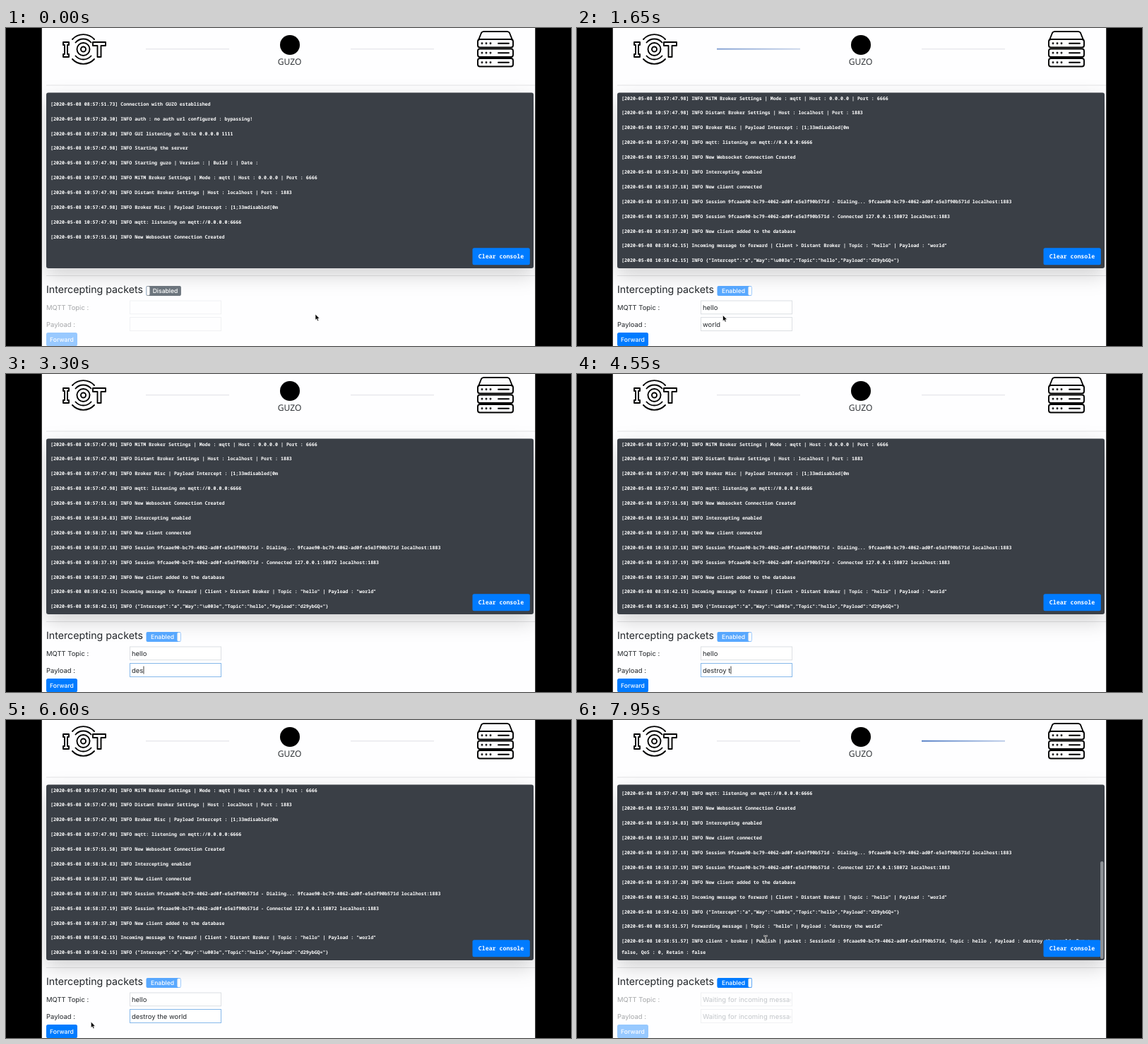
Write an HTML page that moves like this. It is 800 by 450 pixels and loops after 8000 ms.

```html
<!DOCTYPE html>
<html lang="en">
<head>
<meta charset="utf-8">
<title>Packet console</title>
<style>
html, body { margin: 0; width: 100%; height: 100%; overflow: hidden; background: #000; }
svg { display: block; width: 100%; height: 100%; text-rendering: geometricPrecision; }
text { font-family: Inter, Roboto, sans-serif; font-size: 9.45px; fill: #212529; white-space: pre; }
.mono, #lines text { font-family: "Noto Sans Mono", "DejaVu Sans Mono", monospace; font-weight: 700; fill: #fff; }
#lines text { font-size: 6.63px; }
.mid { text-anchor: middle; }
.btn { font-size: 8.6px; fill: #fff; font-weight: 500; }
.icon { fill: none; stroke: #000; stroke-width: 1.9; stroke-linejoin: round; stroke-linecap: round; }
.field { fill: #fff; stroke: #dcdfe3; }
.hint { fill: #6c757d; }
.panel { filter: drop-shadow(0 10px 14px rgba(0, 0, 0, .175)); }
</style>
</head>
<body>
<svg viewBox="0 0 800 450">
  <defs>
    <clipPath id="pageClip"><rect x="50.500" width="699" height="450"/></clipPath>
    <clipPath id="consoleClip"><rect x="57" y="92" width="690" height="248"/></clipPath>
    <clipPath id="fieldClip"><rect x="177" y="380" width="125.500" height="60"/></clipPath>
    <clipPath id="toggleClip"><rect x="198.500" y="365" width="49.300" height="14" rx="2"/></clipPath>
    <linearGradient id="flow">
      <stop offset="0" stop-color="#4a78c4"/><stop offset="1" stop-color="#bccdea"/>
    </linearGradient>
  </defs>

  <g clip-path="url(#pageClip)">
    <rect x="50.500" width="699" height="450" fill="#fefeff"/>

    <g class="icon">
      <path d="M81 20h8v4h-2v13h2v4h-8v-4h2v-13h-2z"/>
      <path d="M123 20h18v5h-6.500v16h-5v-16h-6.500z"/>
      <circle cx="109.500" cy="30" r="3.500"/>
      <circle cx="109.500" cy="30" r="9"/>
      <path d="M98.500 20.500a14.500 14.500 0 0 1 22 0M98.500 39.500a14.500 14.500 0 0 0 22 0"/>
      <path d="M94 16a21 21 0 0 1 31 0M94 44a21 21 0 0 0 31 0"/>
    </g>
    <circle cx="402" cy="24" r="14"/>
    <text class="mid" x="401.500" y="52" style="font:12px 'Open Sans',sans-serif">GUZO</text>
    <g class="icon" id="server"><path d="M669 17l4-10q1-2 3.500-2h33q2.500 0 3.500 2l4 10"/></g>

    <g fill="#ececef">
      <rect x="198" y="28.800" width="118" height="1.800"/>
      <rect x="488" y="28.800" width="118" height="1.800"/>
    </g>
    <rect id="wireIn" x="198" y="28.800" width="118" height="1.800" fill="url(#flow)"/>
    <rect id="wireOut" x="488" y="28.800" width="118" height="1.800" fill="url(#flow)"/>
    <path d="M57 81h692M57 350.500h692" stroke="#e4e4e6"/>

    <rect class="panel" x="57" y="91.500" width="690" height="248.500" rx="3" fill="#3a3f46"/>
    <g clip-path="url(#consoleClip)"><g id="lines"></g></g>
    <rect x="660.500" y="311.300" width="81.300" height="24" rx="2.500" fill="#007bff"/>
    <text class="mono mid" x="701" y="326.400" style="font-size:8.25px;font-weight:600">Clear console</text>
    <rect id="scrollbar" x="741" y="200" width="4.500" height="138" rx="2.200" fill="#8d9196"/>

    <text x="57" y="375" style="font-size:14.2px;font-weight:400">Intercepting packets</text>
    <g id="toggle" clip-path="url(#toggleClip)">
      <g id="slider">
        <rect x="198" y="365" width="50" height="14" fill="#007bff"/>
        <rect x="247.500" y="365" width="50" height="14" fill="#6c757d"/>
        <text class="btn mid" x="221.500" y="375">Enabled</text>
        <text class="btn mid" x="274.500" y="375">Disabled</text>
        <rect x="242.700" y="365.500" width="9.600" height="13" rx="2" fill="#fbfbfc" stroke="#d5d9dd" stroke-width=".6"/>
      </g>
      <rect id="toggleEdge" x="198.800" y="365.300" width="48.700" height="13.400" rx="2" fill="none" stroke-width=".7"/>
    </g>

    <g id="form">
      <text x="57" y="399">MQTT Topic :</text>
      <text x="57" y="422.700">Payload :</text>
      <rect class="field" x="175.500" y="386" width="129" height="18.700"/>
      <rect class="field" id="payloadBox" x="175.500" y="409.500" width="129" height="19"/>
      <rect id="selection" y="413" height="12" fill="#a8cdf6"/>
      <g clip-path="url(#fieldClip)">
        <text id="topic" x="178" y="399"></text>
        <text id="payload" x="178" y="422.700"></text>
      </g>
      <rect id="caret" y="413.500" width=".8" height="11" fill="#111"/>
      <rect id="forward" x="57" y="431" width="44" height="19.200" rx="2.500"/>
      <text class="btn mid" x="79" y="443.700">Forward</text>
    </g>
  </g>

  <g id="cursor">
    <path id="arrow" d="M0 0v8.300l1.900-1.700 1.300 3 1.500-.6-1.300-2.900h2.600z" fill="#000" stroke="#fff" stroke-width=".6"/>
    <path id="hand" d="M-1 .6q0-1 .9-1t.9 1v3.200l3.200.7q1 .3.900 1.400l-.6 3.600h-4.600l-2.900-3.900q-.1-1.300 1.200-.8l1 .9z" fill="#fff" stroke="#000" stroke-width=".9"/>
    <g id="beam" fill="none" stroke-linecap="round">
      <path d="M-2-4.500q2 0 2 1.200v6.600q0 1.200-2 1.200M2-4.500q-2 0-2 1.200m0 6.600q0 1.200 2 1.200" stroke="#fff" stroke-width="1.800"/>
      <path d="M-2-4.500q2 0 2 1.200v6.600q0 1.200-2 1.200M2-4.500q-2 0-2 1.200m0 6.600q0 1.200 2 1.200" stroke="#222" stroke-width=".8"/>
    </g>
  </g>
</svg>

<script>
const LOOP = 8000;
const ENABLE = 990, CONNECT = 1350, INCOMING = 1550, DRAG = 2050;
const TYPE = 2860, KEY_GAP = 205, PRESS = 7200, SEND = 7450;
const PITCH = 20.88, FIRST = 109.8, LAST = 331.3;
const ID = '9fcaae90-bc79-4062-ad0f-e5e3f90b571d';
const NEW_TEXT = 'destroy the world';

// [time shown, clock, message, wrapped remainder]
const LOG = [
  [0, '08:57:51.73', 'Connection with GUZO established'],
  [0, '10:57:20.30', 'INFO auth : no auth url configured : bypassing!'],
  [0, '10:57:20.30', 'INFO GUI listening on %s:%s 0.0.0.0 1111'],
  [0, '10:57:47.98', 'INFO Starting the server'],
  [0, '10:57:47.98', 'INFO Starting guzo | Version : | Build : | Date :'],
  [0, '10:57:47.98', 'INFO MiTM Broker Settings | Mode : mqtt | Host : 0.0.0.0 | Port : 6666'],
  [0, '10:57:47.98', 'INFO Distant Broker Settings | Host : localhost | Port : 1883'],
  [0, '10:57:47.98', 'INFO Broker Misc | Payload Intercept : [1;33mdisabled[0m'],
  [0, '10:57:47.98', 'INFO mqtt: listening on mqtt://0.0.0.0:6666'],
  [0, '10:57:51.58', 'INFO New Websocket Connection Created'],
  [ENABLE, '10:58:34.83', 'INFO Intercepting enabled'],
  [CONNECT, '10:58:37.18', 'INFO New client connected'],
  [CONNECT, '10:58:37.18', `INFO Session ${ID} - Dialing... ${ID} localhost:1883`],
  [CONNECT, '10:58:37.19', `INFO Session ${ID} - Connected 127.0.0.1:58072 localhost:1883`],
  [CONNECT, '10:58:37.20', 'INFO New client added to the database'],
  [INCOMING, '08:58:42.15', 'Incoming message to forward | Client > Distant Broker | Topic : "hello" | Payload : "world"'],
  [INCOMING, '10:58:42.15', 'INFO {"Intercept":"a","Way":"\\u003e","Topic":"hello","Payload":"d29ybGQ="}'],
  [SEND, '08:58:51.57', 'Forwarding message | Topic : "hello" | Payload : "destroy the world"'],
  [SEND, '10:58:51.57', `INFO client > broker | Publish | packet : SessionId : ${ID}, Topic : hello , Payload : destroy the world, Dup :`,
    'false, QoS : 0, Retain : false'],
];

// [time, x, y]
const PATH = [
  [0, 438, 405], [250, 438, 405], [850, 208, 369], [1250, 208, 369], [1850, 206, 419.5],
  [DRAG, 206, 419.5], [2250, 146, 419.5], [6350, 146, 419.5], [6900, 87, 437],
  [7600, 87, 437], [7950, 267, 310], [LOOP, 267, 310],
];
// [time, pointer shape]
const POINTERS = [
  [0, 'arrow'], [800, 'hand'], [1300, 'arrow'], [1750, 'beam'], [TYPE, ''],
  [6350, 'arrow'], [6750, 'hand'], [7680, 'arrow'], [7800, 'beam'],
];

const ui = {};
document.querySelectorAll('[id]').forEach(el => ui[el.id] = el);
const set = (el, attrs) => { for (const k in attrs) el.setAttribute(k, attrs[k]); };
const add = (parent, tag, attrs, text = '') => {
  const el = document.createElementNS(parent.namespaceURI, tag);
  set(el, attrs);
  el.textContent = text;
  return parent.appendChild(el);
};
const clamp = v => Math.min(1, Math.max(0, v));
const ramp = (t, from, to) => clamp((t - from) / (to - from));
const smooth = p => p * p * (3 - 2 * p);
const within = (t, from, to) => t >= from && t < to;
const show = (el, on) => { el.style.display = on ? '' : 'none'; };

for (const y of [16, 29.500, 43]) {
  add(ui.server, 'rect', { x: 668, y, width: 50, height: 11.5, rx: 3 });
  for (const x of [674, 680, 686]) add(ui.server, 'circle', { cx: x, cy: y + 5.8, r: .5 });
  add(ui.server, 'path', { d: `M697 ${y + 5.8}h15` });
}

const rows = LOG.map(([time, clock, message, rest], i) => {
  const y = FIRST + PITCH * i;
  const group = add(ui.lines, 'g', {});
  add(group, 'text', { x: 63, y }, `[2020-05-08 ${clock}] ${message}`);
  if (rest) add(group, 'text', { x: 63, y: y + 16 }, rest);
  return { time, group, bottom: y + (rest ? 16 : 0) };
});

function pointerAt(t) {
  const i = PATH.findIndex((p, k) => k && t <= p[0]);
  const [t0, x0, y0] = PATH[i - 1], [t1, x1, y1] = PATH[i];
  const p = smooth(ramp(t, t0, t1));
  return [x0 + (x1 - x0) * p, y0 + (y1 - y0) * p];
}

function drawConsole(t) {
  let bottom = 0;
  for (const row of rows) {
    const on = t >= row.time;
    show(row.group, on);
    if (on) bottom = row.bottom;
  }
  set(ui.lines, { transform: `translate(0 ${-Math.max(0, bottom - LAST)})` });
  show(ui.scrollbar, t >= SEND);
}

function drawForm(t, mouseX) {
  const active = within(t, INCOMING, SEND);
  const waiting = !active && t >= ENABLE + 140;
  const focused = within(t, DRAG, PRESS);
  const typed = Math.floor((t - TYPE) / KEY_GAP) + 1;
  const hint = waiting ? 'Waiting for incoming messages' : '';

  ui.form.style.opacity = active ? 1 : .4;
  ui.topic.textContent = active ? 'hello' : hint;
  ui.payload.textContent = !active ? hint : t < TYPE ? 'world' : NEW_TEXT.slice(0, typed);
  for (const el of [ui.topic, ui.payload]) el.classList.toggle('hint', !active);
  ui.payloadBox.style.stroke = focused ? '#86b8ea' : '';

  const left = Math.max(177.5, Math.min(203, mouseX));
  show(ui.selection, within(t, DRAG, TYPE));
  set(ui.selection, { x: left, width: 203 - left });

  show(ui.caret, within(t, TYPE, PRESS) && t % 400 < 200);
  set(ui.caret, { x: 178.3 + ui.payload.getComputedTextLength() });
  set(ui.forward, { fill: within(t, 6800, SEND) ? '#0069d9' : '#007bff' });

  const p = ramp(t, ENABLE, ENABLE + 142);
  const slide = 1 - Math.pow(1 - p, 2.2);
  set(ui.slider, { transform: `translate(${-49 * (1 - slide)} 0)` });
  set(ui.toggleEdge, { stroke: t < ENABLE ? '#6c757d' : '#007bff' });
  ui.toggle.style.opacity = active ? .65 : 1;
}

function draw(t) {
  const [x, y] = pointerAt(t);
  drawConsole(t);
  drawForm(t, x);
  ui.wireIn.style.opacity = ramp(t, INCOMING, INCOMING + 150) * (1 - ramp(t, 1850, 2100));
  ui.wireOut.style.opacity = ramp(t, SEND, SEND + 250);

  const shape = POINTERS.filter(p => p[0] <= t).pop()[1];
  for (const name of ['arrow', 'hand', 'beam']) show(ui[name], name === shape);
  set(ui.cursor, { transform: `translate(${x} ${y})` });
}

const start = performance.now();
function tick() {
  draw((performance.now() - start) % LOOP);
  requestAnimationFrame(tick);
}
tick();
</script>
</body>
</html>
```
